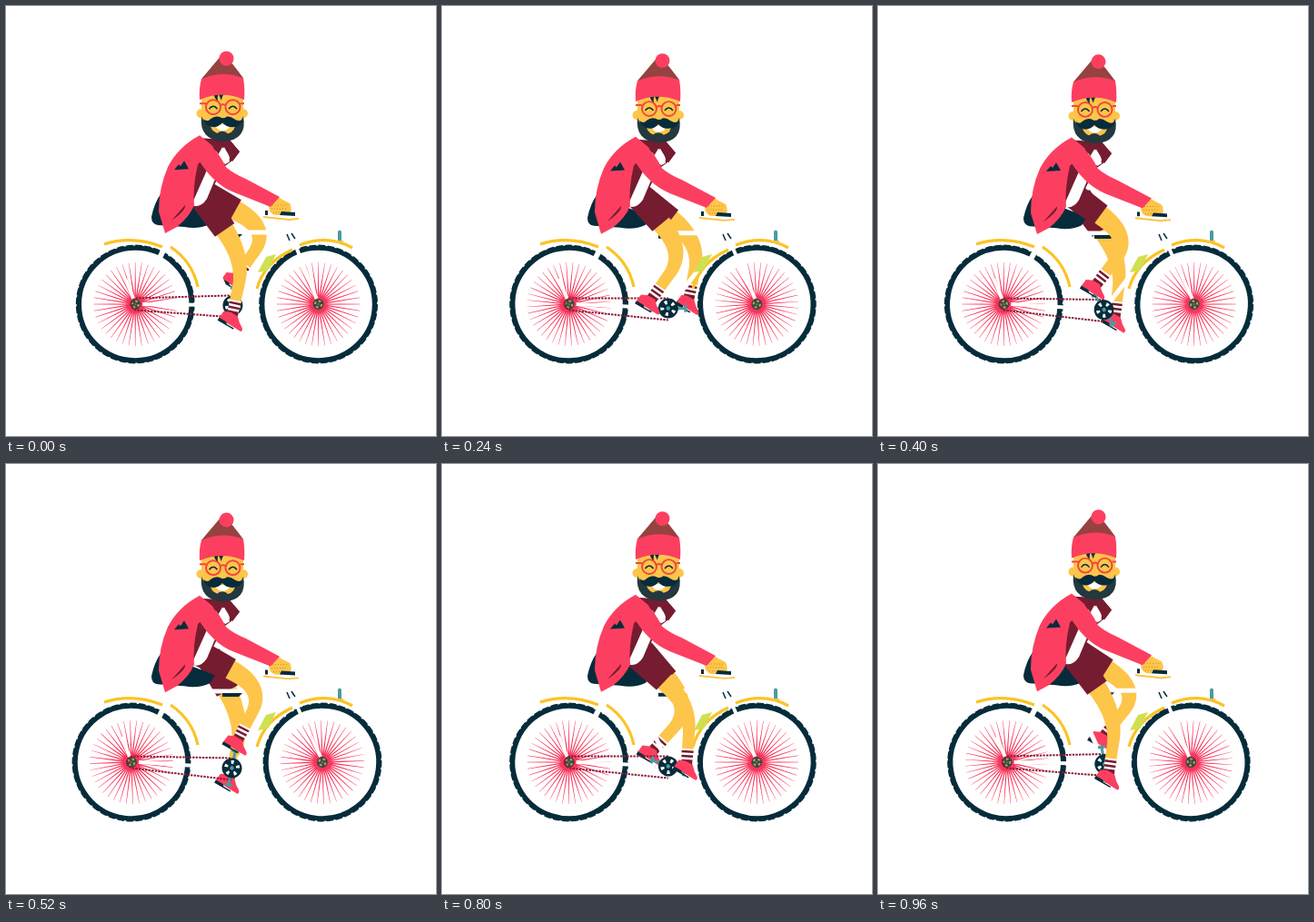
Animation of 473 by 473 pixels, one loop 1 s. Source, as an HTML page:

```html
<!DOCTYPE html>
<html lang="en">
<head>
<meta charset="utf-8">
<title>Cyclist</title>
<style>
html, body { margin: 0; width: 100%; height: 100%; overflow: hidden; background: #fff; }
svg { display: block; width: 100%; height: 100%; }
.dark { fill: #062c3b; }
.beard { fill: #24383f; }
.pink { fill: #fc3f60; }
.maroon { fill: #751c30; }
.yellow { fill: #fdc54a; }
.white { fill: #fff; }
.line { fill: none; }
.tube { fill: none; stroke: #fff; }
.fender { fill: none; stroke: #fcc323; stroke-width: 3.2; }
.chain { fill: none; stroke: #8c1c35; stroke-width: 2; stroke-dasharray: 2.4 1.2; }
</style>
</head>
<body>
<svg viewBox="0 0 473 473">
  <defs>
    <g id="shoe">
      <path class="pink" d="M-13 5L-12 -4L-5 -7L4 -7Q9 -1 15 2Q17 5 15 6Z"/>
      <path class="dark" d="M-13 4.500H-4L-2 6.500H7V8H-13Z"/>
    </g>
    <g id="sock">
      <path class="white" d="M-6.500 -7H6.500L6 9H-6Z"/>
      <path class="maroon" d="M-6.500 -5H6.500V-2.500H-6.500ZM-6.300 0H6.300V2.500H-6.300ZM-6 5H6V11H-6Z"/>
    </g>
    <g id="wheel">
      <circle r="61.900" fill="none" stroke="#062c3b" stroke-width="5.400"/>
      <circle r="64.600" fill="none" stroke="#062c3b" stroke-width="1.600" pathLength="80" stroke-dasharray="1.500 .5"/>
      <path class="spokes" fill="#f8355c"/>
      <circle r="6" fill="#37474a"/>
      <circle r="3.600" fill="none" stroke="#c9a53a" stroke-width="2" pathLength="8" stroke-dasharray="1 1"/>
      <circle r="1.600" fill="#5b6664"/>
    </g>
  </defs>

  <g id="rear"><use href="#wheel"/></g>
  <g id="front"><use href="#wheel"/></g>
  <path id="stays" class="tube" stroke-width="4"/>
  <path class="tube" stroke-width="6" d="M167 281L179 257"/>

  <g id="farLeg"></g>

  <path id="frame" class="tube" stroke-width="5"/>
  <path id="bar" class="dark"/>
  <path class="fender" d="M108 262Q139 252 172 265M181 265Q205 281 211 309"/>
  <path class="fender" d="M276 311Q284 282 315 268M323 263Q354 251 381 266"/>
  <path d="M277 293L286 276L297 273L288 291Z" fill="#cfe052"/>
  <path class="line" stroke="#062c3b" stroke-width="1.500" d="M309 251L312 258M314 250L318 256"/>
  <path d="M365 258V248Q367 245 369 248V258Z" fill="#4a9ba0"/>
  <path d="M363 258H371V260H363Z" fill="#fcc344"/>
  <path id="chain" class="chain"/>
  <g id="ring">
    <path class="line" stroke="#4a9ba0" stroke-width="3" d="M0 -19V19M-4 -19H4M-4 19H4"/>
    <circle class="dark" r="11"/>
    <circle r="6.600" fill="none" stroke="#fff" stroke-width="4" pathLength="10" stroke-dasharray=".7 1.300"/>
    <circle r="2.200" fill="#4a9ba0"/>
  </g>

  <g id="seat">
    <path class="dark" d="M170 207Q163 217 160 232Q160 240 167 241L196 243Q212 246 224 240L230 231Z"/>
  </g>
  <g id="nearLeg"></g>

  <g id="body">
    <path class="maroon" d="M213 145L246 147L257 160L250 169L238 178L222 212L198 222Z"/>
    <path class="white" d="M236 150L244 150L246 168L236 176L221 212Q214 223 204 219L222 178Z"/>
    <path class="pink" d="M213 142Q189 155 178 177Q168 200 168 226L175 250L188 243Q202 232 207 219Q205 200 211 174L229 155Z"/>
    <path class="maroon" d="M182 236L197 219Q198 225 182 236Z"/>
    <path class="dark" d="M185 180L190 174L192 176L196 170L201 179Z"/>
    <path class="yellow" d="M290 214Q299 208 304 213L312 217Q316 224 311 230H296Q289 228 289 220Z"/>
    <path class="line" stroke="#c98e28" stroke-width="1" stroke-dasharray="1 2" d="M293 219H309M292 223H310M294 227H309"/>
    <path class="dark" d="M303 226L318 227V231L301 230ZM285 225H288V230H285Z"/>
    <path class="line" stroke="#fcc344" stroke-width="2" d="M283 232L311 235L322 234"/>
    <path class="pink" d="M212 143L224 152Q235 162 242 177Q250 184 264 190L301 210L291 221L251 205Q226 195 209 164Z"/>
    <path class="maroon" d="M222 147H246L257 160L249 171L240 155L234 163Z"/>
    <path class="white" d="M238 155L244 162L246 171L241 174L234 162Z"/>

    <circle class="yellow" cx="214.500" cy="118" r="5"/>
    <circle class="yellow" cx="261" cy="118" r="5"/>
    <path class="yellow" d="M215 96H261V125Q256 144 238 145Q219 143 215 122Z"/>
    <path class="beard" d="M215 121Q218 130 227 130H248Q258 130 261 121Q266 147 239 149Q212 147 215 121Z"/>
    <path class="yellow" d="M225 132Q238 126 252 132Q250 141 238 141Q227 140 225 132Z"/>
    <path class="white" d="M230 130H247Q245 137 238 137Q232 137 230 130Z"/>
    <path class="dark" d="M238 123Q245 119 251 124Q257 128 261 124Q259 133 249 133Q242 133 238 128Q234 133 228 133Q219 132 217 124Q222 128 225 124Q231 119 238 123Z"/>
    <path class="beard" d="M231 141Q238 134 245 141L239 148Z"/>
    <circle class="yellow" cx="239" cy="119" r="4"/>
    <g class="line" stroke="#f0483f" stroke-width="2">
      <circle cx="228" cy="111" r="8"/>
      <circle cx="249.500" cy="111" r="8"/>
      <path d="M236 109Q239 107 241.500 109M213 107H220M257.500 107H262"/>
    </g>
    <path class="line" stroke="#062c3b" stroke-width="1.500" d="M223.500 113Q228 107 232.500 113M245 113Q249.500 107 254 113"/>
    <path class="dark" d="M228 94Q229 102 233 104Q232 99 234 97L237 104Q237 99 242 94Z"/>
    <path d="M236 55Q226 67 215 80V84H261V79Q250 64 242 55Z" fill="#964240"/>
    <path class="pink" d="M213 103Q212 90 215 80Q238 70 261 79Q263 90 262 103Q238 92 213 103Z"/>
    <circle class="pink" cx="242.500" cy="57.500" r="8"/>
  </g>
</svg>

<script>
const LOOP = 1000, STEP = 40, TURN = Math.PI * 2;
const THIGH = 71, SHIN = 69, CRANK = 21.5, SPOKES = 40;
const $ = id => document.getElementById(id);
const mix = (a, b, u) => [a[0] + (b[0] - a[0]) * u, a[1] + (b[1] - a[1]) * u];
const set = (el, name, value) => el.setAttribute(name, value);
const fix = p => p[0].toFixed(2) + " " + p[1].toFixed(2);
const poly = pts => "M" + pts.map(fix).join("L") + "Z";
const polar = (r, a) => [r * Math.cos(a), r * Math.sin(a)];

let spokes = "";
for (let i = 0; i < SPOKES; i++) {
  const a = i * TURN / SPOKES;
  spokes += poly([polar(5, a - .16), polar(46, a - .004), polar(46, a + .004), polar(5, a + .16)]);
}
set(document.querySelector(".spokes"), "d", spokes);

function makeLeg(id) {
  $(id).innerHTML = '<path class="yellow"/><use href="#sock"/><use href="#shoe"/><path class="maroon"/>';
  return $(id).children;
}
const far = makeLeg("farLeg"), near = makeLeg("nearLeg");

function kneeOf(hip, foot) {
  const dx = foot[0] - hip[0], dy = foot[1] - hip[1];
  const d = Math.min(Math.hypot(dx, dy), THIGH + SHIN - .1);
  const bend = Math.acos((THIGH ** 2 + d * d - SHIN ** 2) / (2 * THIGH * d));
  const p = polar(THIGH, Math.atan2(dy, dx) - bend);
  return [hip[0] + p[0], hip[1] + p[1]];
}

// Tapered outline around a thigh and shin joined by a rounded knee.
function limb(hip, knee, ankle) {
  const a = mix(hip, knee, .45), b = mix(knee, ankle, .55), mid = [hip];
  for (let i = 0; i <= 14; i++) {
    const u = i / 14;
    mid.push(mix(mix(a, knee, u), mix(knee, b, u), u));
  }
  mid.push(ankle);
  const left = [], right = [], n = mid.length - 1;
  mid.forEach((p, i) => {
    const q = mid[Math.max(0, i - 1)], r = mid[Math.min(n, i + 1)];
    const dx = r[0] - q[0], dy = r[1] - q[1], d = Math.hypot(dx, dy);
    const w = 11 - 4.8 * i / n;
    left.push([p[0] - dy / d * w, p[1] + dx / d * w]);
    right.unshift([p[0] + dy / d * w, p[1] - dx / d * w]);
  });
  return poly(left.concat(right));
}

// lift runs from 0 with the pedal at the bottom to 1 at the top.
function drawLeg([skin, sock, shoe, shorts], socket, foot, lift) {
  const hip = [socket[0], socket[1] - 8 * lift];
  const knee = kneeOf(hip, foot);
  const ankle = mix(foot, knee, 15 / SHIN);
  const tilt = Math.atan2(foot[1] - knee[1], foot[0] - knee[0]) * 360 / TURN - 90;
  set(skin, "d", limb(hip, knee, ankle));
  set(sock, "transform", `translate(${fix(ankle)}) rotate(${tilt})`);
  set(shoe, "transform", `translate(${fix(foot)}) rotate(30)`);
  const ux = (knee[0] - hip[0]) / THIGH, uy = (knee[1] - hip[1]) / THIGH;
  const at = (along, side) => [hip[0] + ux * along - uy * side, hip[1] + uy * along + ux * side];
  const hem = 33 - 5 * lift;
  set(shorts, "d", poly([at(-12, -14), at(hem, -13), at(hem, 13), at(-12, 15)]));
}

function draw(time) {
  const t = Math.floor(time % LOOP / STEP) * STEP / LOOP;
  const k = Math.abs(Math.sin(Math.PI * (t - .02)));
  const rear = [142.5 - 4.5 * k, 328], front = [343.3 + 4.7 * k, 328];
  const axle = [249.5 - k, 329 + 5.5 * k];
  const spin = t * 360;

  set($("rear"), "transform", `translate(${fix(rear)}) rotate(${spin})`);
  set($("front"), "transform", `translate(${fix(front)}) rotate(${spin})`);
  set($("stays"), "d", `M${fix([rear[0] - 2, 322])}l-9 -22M${fix([rear[0] + 8, 328])}L${fix(axle)}` +
    `M${fix([front[0] - 2, 322])}L318 262`);
  set($("frame"), "d", `M212 ${249 + k}H315M212 246L${fix(axle)}L304 262`);
  set($("bar"), "d", `M238 ${251 + k}H260L256 ${255 + k}H238Z`);
  set($("chain"), "d", `M${fix([axle[0], axle[1] - 11])}L${fix([rear[0], 321.5])}` +
    `Q${fix([rear[0] - 9, 328])} ${fix([rear[0], 334.5])}L${fix([axle[0], axle[1] + 13])}`);
  set($("chain"), "stroke-dashoffset", -t * 72);
  set($("ring"), "transform", `translate(${fix(axle)}) rotate(${spin + 4})`);

  const squash = `translate(0 328) scale(1 ${1 - .0148 * k}) translate(0 -328)`;
  set($("body"), "transform", squash);
  set($("seat"), "transform", squash);

  const a = t * TURN + .07, hipY = 219 + 1.6 * k;
  const s = Math.sin(a), c = Math.cos(a);
  const x = axle[0], y = axle[1] - 5.5;
  drawLeg(far, [228, hipY], [x + CRANK * s, y - CRANK * c], (1 + c) / 2);
  drawLeg(near, [222, hipY], [x - CRANK * s, y + CRANK * c], (1 - c) / 2);
}

const start = performance.now();
function tick() {
  draw(performance.now() - start);
  requestAnimationFrame(tick);
}
tick();
</script>
</body>
</html>
```
